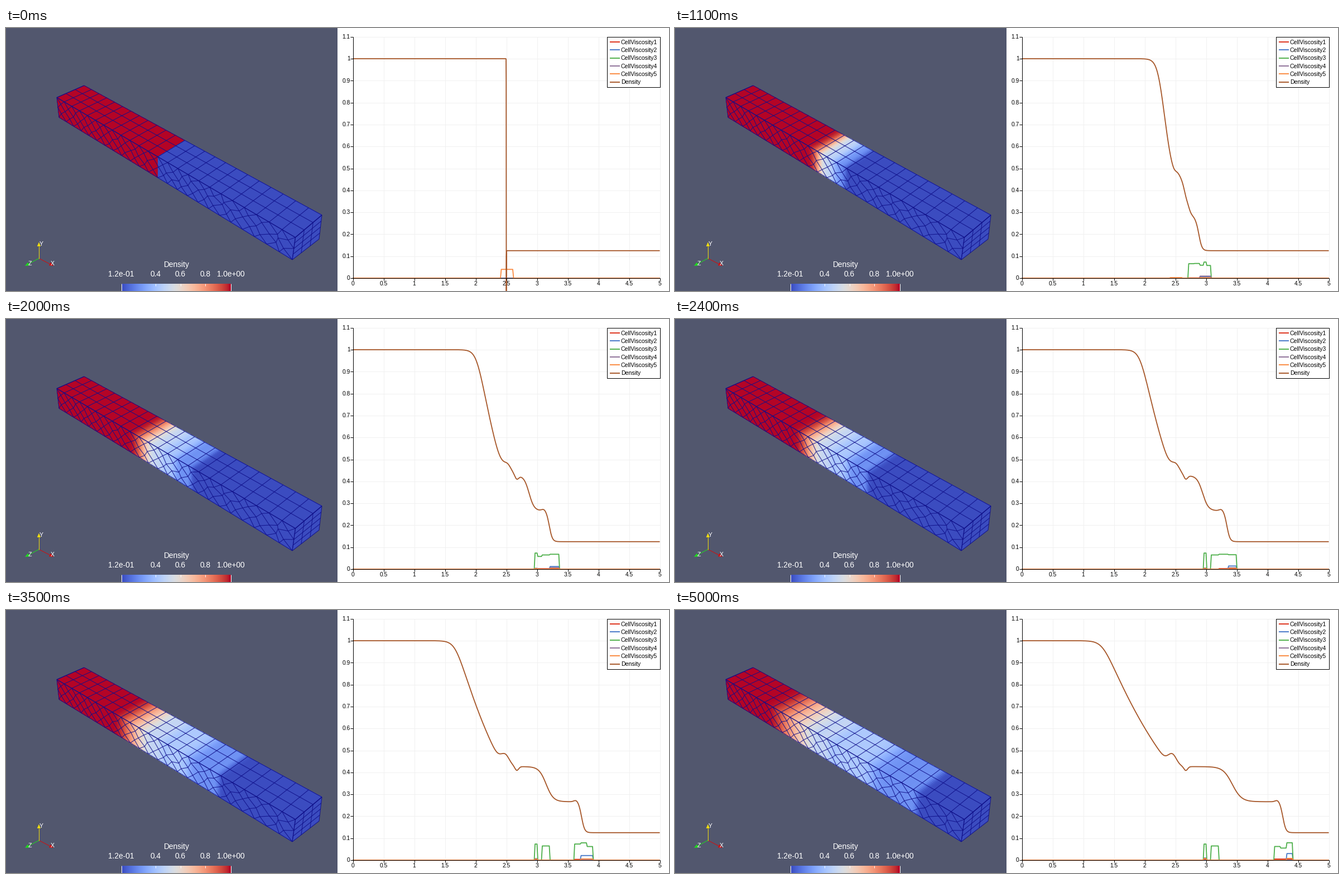
These frames come from a looping animation (1188 px wide and 471 px high, 5.1 s). A matplotlib script:

```python
import numpy as np
import matplotlib.pyplot as plt
from matplotlib.animation import FuncAnimation
from matplotlib.collections import LineCollection, PolyCollection
from matplotlib.patches import Polygon, Rectangle

W, H, DPI = 1188, 471, 72
FRAMES, INTERVAL = 51, 100
CMAP = plt.get_cmap("coolwarm")
NAVY = "#10108a"

# shock tube: state levels and wave speeds
DT, MIDDLE = 0.02, 2.5
LOW, BEHIND, STAR = 0.125, 0.266, 0.426
SOUND, TAIL, CONTACT, SHOCK = 1.183, -0.07, 0.927, 1.752

fig = plt.figure(figsize=(W / DPI, H / DPI), dpi=DPI, facecolor="white")
ax = fig.add_axes([0, 0, 1, 1])
ax.set_xlim(0, W)
ax.set_ylim(H, 0)
ax.axis("off")


def label(x, y, text, size, ha="center", color="black"):
    ax.text(x, y + 0.36 * size, text, fontsize=size, ha=ha, va="baseline",
            color=color, family="Liberation Sans", zorder=8)


def stroke(x, y, color="black", lw=1.0, z=3):
    return ax.plot(x, y, color=color, lw=lw, zorder=z,
                   solid_capstyle="butt", solid_joinstyle="round")[0]


# ---------- flow ----------

def bell(x, center, width):
    return np.exp(-0.5 * ((x - center) / width) ** 2)


def rise(x, center, width):
    return 0.5 + 0.5 * np.tanh(0.8 * (x - center) / width)


def ramp(x, width):
    """max(x, 0) with a rounded corner."""
    return width * np.logaddexp(0, x / width)


def density(k, x):
    """Smeared Riemann solution with a small defect left at the middle."""
    t = max(k * DT, 1e-4)
    grown = min(1, k / 8)
    xi = (x - MIDDLE) / t
    w = 0.58 * (0.001 + grown * (0.07 + 0.001 * k)) / t
    xi = -SOUND + ramp(xi + SOUND, w) - ramp(xi - TAIL, 0.4 * w)
    rho = (5 / 6 - xi / (6 * SOUND)) ** 5

    contact, shock = MIDDLE + CONTACT * t, MIDDLE + SHOCK * t
    rho -= (STAR - BEHIND) * rise(x, contact, 0.001 + grown * (0.03 + 0.0018 * k))
    rho -= (BEHIND - LOW) * rise(x, shock, 0.001 + grown * 0.039)
    rho += grown * (0.055 * bell(x, 2.54 - 0.0018 * k, 0.07)
                    - 0.018 * bell(x, 2.67, 0.03)
                    + 0.008 * bell(x, shock - 0.09, 0.035))
    return rho


n = np.arange(-3, 26)
CELLS = 2.51 + 0.1 * n - 0.13 * np.exp(-((n - 7) / 2) ** 2)
CENTERS = (CELLS[:-1] + CELLS[1:]) / 2
STRENGTH = np.random.default_rng(3).uniform(0.055, 0.08, len(CENTERS))


def viscosity(k):
    """Level of the five viscosities in every cell."""
    gap = CENTERS - (MIDDLE + SHOCK * k * DT)
    near = (abs(gap) < 0.16) & (k > 0)
    ahead = (abs(gap - 0.11) < 0.09) & (k > 0)
    first = (abs(CENTERS - 2.985) < 0.03) & (k >= 10)
    second = (abs(CENTERS - 3.145) < 0.03) & (k >= 22)
    start = (abs(CENTERS - MIDDLE) < 0.1) * 0.04 * np.exp(-k / 4)
    late = k / 50
    return [
        0.005 * late * (near | first),
        np.maximum(0.03 * late * ahead, 0.01 * late * first),
        STRENGTH * (near | first | second),
        0.012 * (1 - late) * ahead,
        np.maximum(start, 0.008 * late * (near & ahead | first)),
    ]


def sample(levels, x):
    i = np.searchsorted(CELLS, x, "right") - 1
    y = np.r_[levels, 0][np.clip(i, -1, len(levels))]
    return np.convolve(y, np.ones(3) / 3, "same")


# ---------- bar ----------

TOP_NEAR = np.array([(91, 124.5), (518.5, 375)])
TOP_FAR = np.array([(140, 103), (566, 335)])
LOW_NEAR = np.array([(95, 160), (513, 415)])
LOW_END = np.array((561, 378))
END = np.array([TOP_NEAR[1], TOP_FAR[1], LOW_END, LOW_NEAR[1]])
COLS, LAYERS, LEVELS = 24, 3, 4


def rail(edge, x):
    """Point at length x (0..5) of an edge, foreshortened."""
    t = np.asarray(x) / 5
    s = t / (t + 1.36 * (1 - t))
    return edge[0] + (edge[1] - edge[0]) * s[..., None]


def face(a, b, x, v):
    p, q = rail(a, x), rail(b, x)
    return p + (q - p) * np.asarray(v)[..., None]


def strips(a, b, x):
    p, q = rail(a, x), rail(b, x)
    return np.stack([p[:-1], p[1:], q[1:], q[:-1]], axis=1)


def grid(a, b, c, d, across, down):
    """Lines dividing the quad a-b-c-d."""
    rows = [[a + (d - a) * v, b + (c - b) * v]
            for v in np.linspace(0, 1, down + 1)]
    cols = [[a + (b - a) * u, d + (c - d) * u]
            for u in np.linspace(0, 1, across + 1)]
    return rows + cols


def top_mesh():
    ticks = np.linspace(0, 5, COLS + 1)
    cross = list(np.stack([rail(TOP_NEAR, ticks), rail(TOP_FAR, ticks)], axis=1))
    return cross + grid(*TOP_NEAR, *TOP_FAR[::-1], 1, LAYERS)


def side_mesh():
    """Diamond lattice, looser in the right half."""
    rng = np.random.default_rng(5)
    cols = 2 * COLS
    i, j = np.meshgrid(np.arange(cols + 1), np.arange(LEVELS + 1),
                       indexing="ij")
    x, v = 5 * i / cols, j / LEVELS
    inner = (j > 0) & (j < LEVELS) & (i > 0) & (i < cols)
    loose = np.where(x > MIDDLE, 1, 0.5) * inner
    x = x + rng.uniform(-0.05, 0.05, x.shape) * loose
    v = v + rng.uniform(-0.07, 0.07, v.shape) * loose
    p = face(TOP_NEAR, LOW_NEAR, x, v)
    segs = [[p[a, b], p[c, b + 1]]
            for a in range(cols + 1) for b in range(LEVELS)
            for c in (a - 1, a + 1) if (a + b) % 2 == 0 and 0 <= c <= cols]
    return segs + grid(*TOP_NEAR, *LOW_NEAR[::-1], 1, 1)


ax.add_patch(Rectangle((0, 0), 594, H, color="#52576e", lw=0, zorder=0))

cuts = np.linspace(0, 5, 201)
mids = (cuts[:-1] + cuts[1:]) / 2
skin = PolyCollection(
    np.concatenate([strips(TOP_NEAR, TOP_FAR, cuts),
                    strips(TOP_NEAR, LOW_NEAR, cuts)]),
    edgecolors="none", antialiaseds=False, zorder=1)
ax.add_collection(skin, autolim=False)
ax.add_patch(Polygon(END, facecolor=CMAP(0.0), edgecolor="none", zorder=1))
mesh = top_mesh() + side_mesh() + grid(*END, LAYERS, LEVELS)
ax.add_collection(LineCollection(mesh, colors=NAVY, linewidths=1.1,
                                 alpha=0.85, zorder=2), autolim=False)

# colour scale
for x in range(196):
    ax.add_patch(Rectangle((207 + x, 458), 1, 13, lw=0, zorder=1,
                           antialiased=False, color=CMAP(x / 195)))
for x, text in ((206.5, "1.2e-01"), (268, "0.4"), (312.5, "0.6"),
                (357, "0.8"), (403, "1.0e+00")):
    stroke([x, x], [458, H if len(text) > 3 else 462], "white")
    label(x, 440, text, 13.8, color="white")
label(306, 423.5, "Density", 13.8, color="white")

# orientation axes
HUB = np.array((59, 412.5))
for name, color, tip, pos in (("X", "#d01010", (85, 426), (83.5, 421)),
                              ("Z", "#20d820", (34, 426), (43, 421)),
                              ("Y", "#f0dc10", (59, 383.5), (63.5, 386))):
    arm = np.array(tip) - HUB
    along = arm / np.hypot(*arm)
    side = 3.2 * along[::-1] * (-1, 1)
    neck = tip - 7.5 * along
    stroke([HUB[0], neck[0]], [HUB[1], neck[1]], color)
    ax.add_patch(Polygon([tip, neck + side, neck - side], color=color,
                         lw=0, zorder=4))
    label(*pos, name, 10.5, color="white")


# ---------- chart ----------

def px(x):
    return 621.5 + 110 * np.asarray(x)


def py(y):
    return 448 - 393 * np.asarray(y)


for i in range(11):
    x = px(i / 2)
    stroke([x, x], [16, 448], "#f0f0f0", 1, 1)
    stroke([x, x], [448, 452], "black", 1, 6)
    label(x, 457, f"{i / 2:g}", 10.3)
for i in range(12):
    y = py(i / 10)
    stroke([621, 1171.5], [y, y], "#f0f0f0", 1, 1)
    stroke([617, 622], [y, y], "black", 1, 6)
    label(616.5, y - 0.5, f"{i / 10:g}", 10.3, "right")
stroke([621.5, 621.5], [16, 448], z=6)
stroke([621, 1172], [448, 448], z=6)

ax.add_patch(Rectangle((1076.5, 16), 95, 89.5, facecolor="white",
                       edgecolor="black", lw=1, zorder=6))
COLORS = ["#dc2d16", "#4678c8", "#4daf4a", "#8c6e96", "#fa8a40", "#a65628"]
curves = []
for i, color in enumerate(COLORS):
    y = 25 + 14.3 * i
    stroke([1082, 1100], [y, y], color, 1.9, 7)
    label(1102, y, f"CellViscosity{i + 1}" if i < 5 else "Density", 10.5, "left")
    curves.append(stroke([], [], color, 1.8, 4 + i * 0.1))

step_x = np.linspace(0, 5, 1101)
curve_x = np.linspace(0, 5, 2201)


def draw(k):
    for line, levels in zip(curves, viscosity(k)):
        line.set_data(px(step_x), py(sample(levels, step_x)))
    curves[-1].set_data(px(curve_x), py(density(k, curve_x)))
    tone = CMAP(np.clip((density(k, mids) - LOW) / (1 - LOW), 0, 1))
    skin.set_facecolor(np.concatenate([tone, tone]))
    return [*curves, skin]


anim = FuncAnimation(fig, draw, frames=FRAMES, interval=INTERVAL,
                     repeat=True, blit=False)
plt.show()
```
